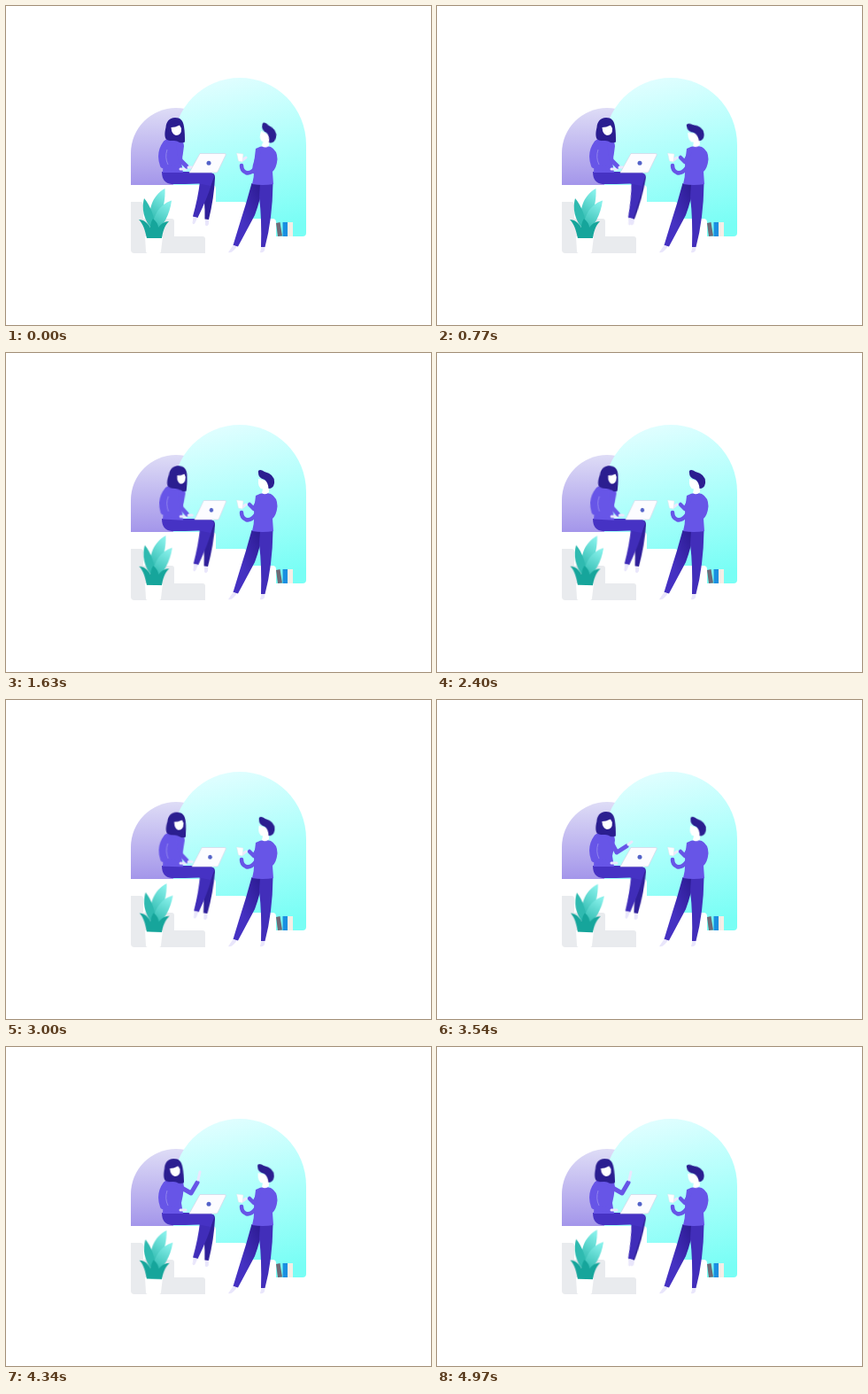
Write an HTML page that moves like this. It is 480 by 360 pixels and loops after 5010 ms.

```html
<!DOCTYPE html>
<html lang="en">
<head>
<meta charset="utf-8">
<title>Two colleagues</title>
<style>
  html, body { margin: 0; width: 100%; height: 100%; overflow: hidden; background: #fff; }
  svg { display: block; width: 100vw; height: 100vh; }

  .skin { fill: #fff; }
  .shoe { fill: #e9e6fb; }
  .hair { fill: #2b1e90; }
  .top { fill: #6755e7; }
  .limb { fill: none; stroke: #6755e7; stroke-linecap: round; stroke-linejoin: round; }
  .hand { fill: none; stroke: #ebe8fd; stroke-width: 3; stroke-linecap: round; }

  .move { animation: 5010ms ease-in-out infinite; }
  .body { animation-name: lean; transform-origin: 188px 189px; }
  .head { animation-name: nod; transform-origin: 191px 152px; }
  .face { animation-name: turn; transform-origin: 192px 141px; }
  .arm { animation-name: wave; }
  .palm { animation-name: palm; }
  .laptop { animation-name: tip; transform-origin: 250px 188px; }
  .near-shin { --swing: -6deg; animation-name: swing; transform-origin: 226px 192px; }
  .far-shin { --swing: 7deg; animation-name: swing; transform-origin: 230px 192px; }
  .man-head { animation-name: listen; transform-origin: 291px 156px; }
  .man-arm { animation-name: reach; }
  .leaves { animation-name: sway; transform-origin: 167px 262px; }

  @keyframes lean {
    0%, 17% { transform: none; }
    30%, 54% { transform: rotate(3deg); }
    66%, 100% { transform: none; }
  }
  @keyframes nod {
    0%, 17% { transform: none; }
    30%, 54% { transform: translate(0, 1px) rotate(3deg); }
    66% { transform: none; }
    86%, 100% { transform: translate(-1px, 0) rotate(-2deg); }
  }
  @keyframes turn {
    0%, 17% { transform: none; }
    30%, 54% { transform: translate(2.5px, 0) scaleX(.84); }
    66%, 100% { transform: none; }
  }
  @keyframes wave {
    0%, 64% { d: path("M195 157 L197 174 L204 181"); }
    70.7% { d: path("M195 157 L203 172 L214 165"); }
    79%, 100% { d: path("M195 157 L209 165 L216 153"); }
  }
  @keyframes palm {
    0%, 64% { d: path("M206 182 L210 182"); }
    70.7% { d: path("M216 163 L220 160"); }
    79%, 100% { d: path("M217 150 L219 141"); }
  }
  @keyframes tip {
    0%, 17% { transform: none; }
    30%, 54% { transform: scaleX(.86); }
    66%, 100% { transform: none; }
  }
  @keyframes swing {
    0% { transform: none; }
    15.4% { transform: rotate(var(--swing)); }
    31%, 48% { transform: rotate(calc(var(--swing) * .15)); }
    70.7% { transform: rotate(calc(var(--swing) * .35)); }
    85% { transform: none; }
    99.2%, 100% { transform: rotate(var(--swing)); }
  }
  @keyframes listen {
    0% { transform: rotate(12deg); }
    15.4% { transform: rotate(-8deg); }
    32.5%, 48% { transform: none; }
    70.7% { transform: rotate(4deg); }
    86.6% { transform: rotate(-2deg); }
    99.2%, 100% { transform: rotate(-8deg); }
  }
  @keyframes reach {
    0% { d: path("M285 166 L281 180 L280 187"); }
    12%, 100% { d: path("M285 166 L280 176 L275 171"); }
  }
  @keyframes sway {
    0% { transform: none; }
    15.4% { transform: none; }
    45% { transform: rotate(1.5deg); }
    72% { transform: rotate(2.5deg) scaleY(.98); }
    100% { transform: rotate(1.5deg); }
  }
</style>
</head>
<body>
<svg viewBox="0 0 480 360" xmlns="http://www.w3.org/2000/svg">
  <defs>
    <linearGradient id="lilac" x2="0" y2="1">
      <stop stop-color="#dedcf6"/><stop offset="1" stop-color="#a395ea"/>
    </linearGradient>
    <linearGradient id="aqua" x1=".4" x2=".6" y2="1">
      <stop stop-color="#e0feff"/><stop offset=".5" stop-color="#abfffb"/><stop offset="1" stop-color="#78fef5"/>
    </linearGradient>
    <linearGradient id="trouser" x1=".9" x2=".3" y2=".6">
      <stop stop-color="#2c1b92"/><stop offset="1" stop-color="#4531c2"/>
    </linearGradient>
    <linearGradient id="leaf" x1=".6" x2=".3" y2="1">
      <stop stop-color="#86f0ea"/><stop offset="1" stop-color="#27b5aa"/>
    </linearGradient>
  </defs>

  <!-- arches and steps -->
  <path fill="url(#lilac)" d="M141 203V166A51 51 0 0 1 243 166V203Z"/>
  <path fill="url(#aqua)" d="M189 260V156.500A75 75.500 0 0 1 339 156.500V256Q339 260 335 260Z"/>
  <path fill="#fff" d="M141 202H233Q237 202 237 206V221H268Q272 221 272 225V240H301Q305 240 305 244V260H340V280H141Z"/>
  <path fill="#e9ebee" d="M141 221H152Q155 221 155 224V240H187Q190 240 190 243V260H222Q225 260 225 263V279H145Q141 279 141 275Z"/>

  <!-- books -->
  <path fill="#716a76" d="M305 245L309.500 244L312 259.500L307 260Z"/>
  <rect x="312.500" y="244" width="5.500" height="16" fill="#1a8fe0"/>
  <rect x="318" y="244" width="6" height="16" fill="#f6eee6"/>

  <!-- plant -->
  <path fill="#fff" d="M157 260H177L175 277Q175 279 173 279H160Q158 279 158 277Z"/>
  <g class="move leaves">
    <path fill="url(#leaf)" d="M163 248C160 230 165 214 179.500 206C180 218 178 230 171 248Z"/>
    <path fill="#2fbab0" d="M165 252C155 241 153 228 156 217C163 225 168 238 169 252Z"/>
    <path fill="url(#leaf)" d="M165 256C165 237 173 224 187 219.500C185 236 177 248 170 256Z"/>
    <path fill="#16a59b" d="M159 262C157 253 155 246 150 241C156 241 160 245 163 250C163 246 164 243 166 240C170 243 172 247 172 250C175 246 179 243 184 243C179 248 177 255 176 262Z"/>
  </g>

  <!-- seated woman -->
  <g class="move far-shin">
    <path fill="#2f1f99" d="M221 189H233Q236 189 236 194Q235 216 229 241L224.500 240.500Q225 218 221 200Z"/>
    <path class="shoe" d="M225 241H229L229 246Q227 250 225 247Z"/>
  </g>
  <g class="move near-shin">
    <path fill="#402db9" d="M219 192H234Q232 207 216.500 239L211 237.500Q217 216 219 198Z"/>
    <path class="shoe" d="M211.500 238L216 239L214 244Q212 248 210.500 245Z"/>
  </g>
  <path fill="#4632c4" d="M176 187H229Q235 188 235 193L231 203L218 200.500Q202 201 187 201Q176 200 176 187Z"/>
  <g class="move body">
    <path class="top" d="M180 151Q186 148 194 149Q201 150 201 158Q200 168 198 176L200 188H177Q178 175 176 166Q175 155 180 151Z"/>
    <path class="limb" stroke-width="6" d="M180 155Q172 166 177 180L193 184"/>
    <path fill="none" stroke="#9b90ef" stroke-width=".8" d="M182 162Q179 171 183 179"/>
    <path class="hand" d="M197 184L203 184"/>
    <g class="move head">
      <path class="hair" d="M191 126C184 126 181 131 180.500 137C179 143 179 148 181 150.500C185 153 189 152 193 152.500C197 155 200 154.500 202 153.500C202 148 202 142 201 136C200 129 197 126 191 126Z"/>
      <path class="skin move face" d="M186.500 137Q191 137 196 134.500L198 138Q198.500 146 192 146Q187 145 186.500 137Z"/>
    </g>
    <path class="limb move arm" stroke-width="5" d="M195 157L197 174L204 181"/>
    <path class="hand move palm" d="M206 182L210 182"/>
  </g>
  <g class="move laptop">
    <path fill="#fcfcff" stroke="#d5d4e6" stroke-width=".7" stroke-linejoin="round" d="M219 166.500H247Q249 166.500 248 168.500L239 187Q238.500 188 237 188H207Z"/>
    <circle cx="229" cy="177.300" r="2.500" fill="#5362c8"/>
  </g>

  <!-- standing man -->
  <path fill="url(#trouser)" d="M277.500 200H290Q288 217 281 236L262 271.500L256.500 270Q265 242 271 223Z"/>
  <path fill="#422eba" d="M287 200H301.500Q301 240 292.500 272H288Q289 240 286 216Z"/>
  <path class="shoe" d="M256.500 270L261 271.500L257 276Q254 279 251 278Z"/>
  <path class="shoe" d="M288.500 272H292.500L292 276Q290 279 287 278Z"/>
  <path class="limb" stroke="#5a47d8" stroke-width="4.500" d="M283 181Q277 190 271 188Q266 186 266 180"/>
  <path class="top" d="M282 161Q290 156 299 159Q306.500 163 306.500 173Q305.500 183 301 187L302 201Q290 203 278 201Q281 190 280 178Z"/>
  <path class="limb move man-arm" stroke-width="4.500" d="M285 166L280 176L275 171"/>
  <path class="hand" d="M267 174L271 171"/>
  <path fill="#fff" stroke="#dce5ef" stroke-width=".5" d="M260.500 166L268 167L267 176L262.500 175Z"/>
  <g class="move man-head">
    <path class="skin" d="M285 142Q284 153 290 153.500L289 158Q293 161 297 157L297 145Z"/>
    <path class="hair" d="M285 133Q287 130.500 292 134Q304 137 303 147Q302 153 296.500 153Q296 146 292 143Q284 141 285 133Z"/>
  </g>
</svg>
</body>
</html>
```
